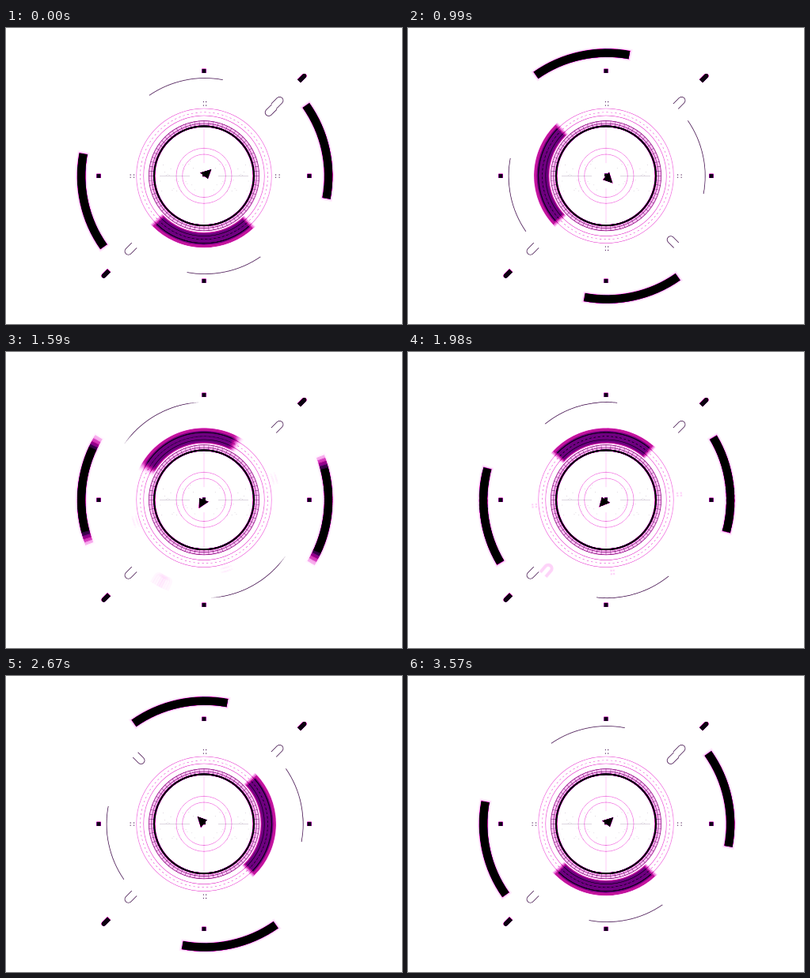
Animation, 500 px wide and 375 px high, one loop 3600 ms. Source, as an HTML page with a canvas:

```html
<!DOCTYPE html>
<html lang="en">
<head>
<meta charset="utf-8">
<title>Radar dial</title>
<style>
  html, body { margin: 0; width: 100%; height: 100%; overflow: hidden; background: #fff; }
  canvas { display: block; width: 500px; height: 375px; }
</style>
</head>
<body>
<canvas id="stage" width="500" height="375"></canvas>
<script>
const W = 500, H = 375, CX = 250, CY = 187.3, ORBIT_SHIFT = 1.1;
const FRAME = 30, FRAMES = 120, SAMPLES = 5, SHUTTER = 0.5;
const BLACK = '0,0,0', PLUM = '52,0,64';
const rad = d => d * Math.PI / 180;
const clamp = x => Math.min(1, Math.max(0, x));

const stage = document.getElementById('stage').getContext('2d', { willReadFrequently: true });

// Glowing parts are drawn as black ink; ink density then picks a colour from this ramp.
const RAMP = ['ffffff', 'ffdcfb', 'f8b0ee', 'ec7edc', 'd840c0', 'c01098',
              '98008c', '68007e', '3c004c', '160020', '000000']
  .map(h => [0, 2, 4].map(i => parseInt(h.slice(i, i + 2), 16)));
const LUT = Array.from({ length: 256 }, (_, v) => {
  const x = (1 - v / 255) * (RAMP.length - 1), i = Math.min(RAMP.length - 2, Math.floor(x));
  return RAMP[i].map((c, k) => c + (RAMP[i + 1][k] - c) * (x - i));
});

function ink(g, alpha, width = 1, rgb = BLACK) {
  g.strokeStyle = g.fillStyle = `rgba(${rgb},${alpha})`;
  g.lineWidth = width;
}

function arc(g, r, mid = 180, span = 360) {
  g.beginPath();
  g.arc(0, 0, r, rad(mid - span / 2), rad(mid + span / 2));
  g.stroke();
}

function line(g, x1, y1, x2, y2) {
  g.beginPath();
  g.moveTo(x1, y1);
  g.lineTo(x2, y2);
  g.stroke();
}

function turned(g, deg, draw) {
  g.save();
  g.rotate(rad(deg));
  draw();
  g.restore();
}

// Half of a pill lying along a spoke, with its round end at `closed`.
function halfPill(g, open, closed, half) {
  const dir = Math.sign(closed - open), bend = closed - dir * half;
  g.beginPath();
  g.moveTo(open, -half);
  g.lineTo(bend, -half);
  g.arc(bend, 0, half, -Math.PI / 2, Math.PI / 2, dir < 0);
  g.lineTo(open, half);
}

function sprite(draw) {
  const canvas = document.createElement('canvas');
  canvas.width = canvas.height = 720;
  const g = canvas.getContext('2d');
  g.translate(360, 360);
  g.scale(2, 2);
  draw(g);
  return canvas;
}

const outerArcs = sprite(g => {
  for (const mid of [-12.3, 167.7]) {
    ink(g, 0.05, 15); arc(g, 156, mid, 47.5);
    ink(g, 0.1, 12.5); arc(g, 156, mid, 46.5);
    ink(g, 1, 10.6); arc(g, 156, mid, 45.6);
  }
});

const thinArcs = sprite(g => {
  ink(g, 0.8, 0.9, PLUM);
  arc(g, 124, 258, 45);
  arc(g, 124, 78, 45);
});

const innerParts = sprite(g => {
  ink(g, 0.14, 20); arc(g, 81.3, 91.3, 93);
  ink(g, 0.2, 19.5); arc(g, 81.3, 91.3, 91);
  ink(g, 0.25, 19); arc(g, 81.3, 91.3, 88.5);
  ink(g, 0.36, 14.5); arc(g, 80.2, 91.3, 86);
  ink(g, 0.65, 1.2); arc(g, 85.5, 91.3, 86);
  ink(g, 0.35, 1); arc(g, 76.3, 91.3, 86);
  ink(g, 0.6, 1); g.setLineDash([2.5, 3]); arc(g, 80.5, 91.3, 86); g.setLineDash([]);

  ink(g, 1);
  g.beginPath();
  g.moveTo(9.5, -8.5);
  g.lineTo(-5, -4);
  g.lineTo(5, 4);
  g.fill();
});

// Small orbiting details: crisp at rest, a pale smear while turning.
const details = (alpha, width, dot, rgb) => sprite(g => {
  ink(g, alpha, width, rgb);
  turned(g, -45, () => { halfPill(g, 124, 109.5, 4.5); g.stroke(); });
  for (const a of [0, 180, 270]) turned(g, a, () => {
    for (const r of [89.5, 94]) for (const s of [-1.6, 1.6])
      g.fillRect(r - dot / 2, s - dot / 2, dot, dot);
  });
});
const crisp = details(0.8, 0.9, 1.2, PLUM), smear = details(0.11, 4, 2.2, BLACK);

const glowParts = sprite(g => {
  ink(g, 0.3, 0.9); arc(g, 85.3);
  ink(g, 0.3, 0.9); g.setLineDash([2.5, 3]); arc(g, 80.5); g.setLineDash([]);
  ink(g, 0.34, 0.9); arc(g, 76.3);
  ink(g, 0.15, 5.5); arc(g, 67);
  ink(g, 0.36, 0.9); arc(g, 69.7);
  ink(g, 0.3, 0.9); arc(g, 66.2);
  ink(g, 0.98, 2.5); arc(g, 62.9);

  ink(g, 0.93);
  for (const a of [0, 90, 180, 270]) turned(g, a, () => g.fillRect(130.3, -2.7, 5.4, 5.4));
  for (const a of [-45, 135]) turned(g, a, () => {
    ink(g, 0.95); halfPill(g, 169.5, 182, 3); g.fill();
  });

  ink(g, 0.15);
  line(g, 0, -61, 0, -16);
  line(g, 0, 16, 0, 61);
});

const fineParts = sprite(g => {
  ink(g, 0.5, 0.7, PLUM);
  for (let a = 0; a < 360; a += 5) turned(g, a, () => line(g, 64, 0, 69.7, 0));
  ink(g, 0.35, 0.8, PLUM); arc(g, 69.7);
  ink(g, 0.3, 0.8, PLUM); arc(g, 66.2);
  ink(g, 0.8, 0.9, PLUM);
  for (const a of [-45, 135]) turned(g, a, () => { halfPill(g, 124.5, 139.5, 4.5); g.stroke(); });
  ink(g, 0.17, 1, PLUM);
  line(g, -56, 0.2, -18, 0.2);
  line(g, 18, 0.2, 56, 0.2);
  ink(g, 0.18, 1, PLUM);
  for (let i = 0; i < 24; i++) {
    const x = 12 + i * 1.9, y = 19 * Math.sin(i * i * 1.7 + 2);
    for (const s of [-1, 1]) g.fillRect(s * x, y, 0.9, 0.9);
  }
});

// Quarter turns: a slow wind-up backwards, then a fast swing.
const STARTS = [15.5, 45.25, 70.25, 101.4], WIND_UP = 12, SWING = 12, DIP = 0.07;
const easeInOut = x => x < 0.5 ? 4 * x ** 3 : 1 - 4 * (1 - x) ** 3;

function turns(frame) {
  return STARTS.reduce((sum, start) => {
    const back = clamp((frame - start + WIND_UP) / WIND_UP);
    const swing = easeInOut(clamp((frame - start) / SWING));
    return sum - DIP * back * back * (3 - 2 * back) + (1 + DIP) * swing;
  }, 0);
}

const blurCanvas = document.createElement('canvas');
blurCanvas.width = W;
blurCanvas.height = H;
const blur = blurCanvas.getContext('2d');

// Averages several poses across the shutter time.
function drawBlurred(image, frame, { direction = 1, opacity = 1, shift = ORBIT_SHIFT } = {}) {
  blur.clearRect(0, 0, W, H);
  blur.globalCompositeOperation = 'lighter';
  blur.globalAlpha = 1 / SAMPLES;
  for (let i = 0; i < SAMPLES; i++) {
    const offset = (i / (SAMPLES - 1) - 0.5) * SHUTTER;
    blur.save();
    blur.translate(CX + shift, CY + shift / 4);
    blur.rotate(direction * turns(frame + offset) * Math.PI / 2);
    blur.drawImage(image, -180, -180, 360, 360);
    blur.restore();
  }
  stage.globalAlpha = opacity;
  stage.drawImage(blurCanvas, 0, 0);
  stage.globalAlpha = 1;
}

const drawFixed = image => stage.drawImage(image, CX - 180, CY - 180, 360, 360);

function drawCore() {
  stage.save();
  stage.translate(CX, CY);
  ink(stage, 0.3, 0.9);
  arc(stage, 35);
  arc(stage, 27.3);
  ink(stage, 0.95);
  stage.fillRect(-2, -3, 4, 4);
  stage.restore();
}

function drawSideMarks() {
  ink(stage, 0.6, 1, PLUM);
  for (const [x, inward] of [[49.5, 4], [449.5, -4]]) {
    line(stage, x, 182.5, x, 193);
    line(stage, x, 187.5, x + inward, 187.5);
  }
}

function colourise() {
  const image = stage.getImageData(0, 0, W, H), px = image.data;
  for (let i = 0; i < px.length; i += 4) {
    if (px[i] === 255) continue;
    const [r, g, b] = LUT[px[i]];
    px[i] = r;
    px[i + 1] = g;
    px[i + 2] = b;
  }
  stage.putImageData(image, 0, 0);
}

function render(frame) {
  const p = turns(frame), rest = 1 - clamp(Math.abs(p - Math.round(p)) / 0.05);
  const marked = frame % 30 >= 10 && frame % 30 <= 20;

  stage.fillStyle = '#fff';
  stage.fillRect(0, 0, W, H);
  drawFixed(glowParts);
  if (!marked) drawCore();
  drawBlurred(outerArcs, frame, { direction: -1 });
  drawBlurred(innerParts, frame, { shift: 0 });
  if (rest < 1) drawBlurred(smear, frame, { opacity: 1 - rest });
  colourise();

  drawFixed(fineParts);
  drawBlurred(thinArcs, frame);
  if (rest > 0) drawBlurred(crisp, frame, { opacity: rest });
  if (marked) drawSideMarks();
}

const begin = performance.now();
let shown = -1;
function tick() {
  const frame = Math.floor((performance.now() - begin) / FRAME) % FRAMES;
  if (frame !== shown) render(shown = frame);
  requestAnimationFrame(tick);
}
tick();
</script>
</body>
</html>
```
